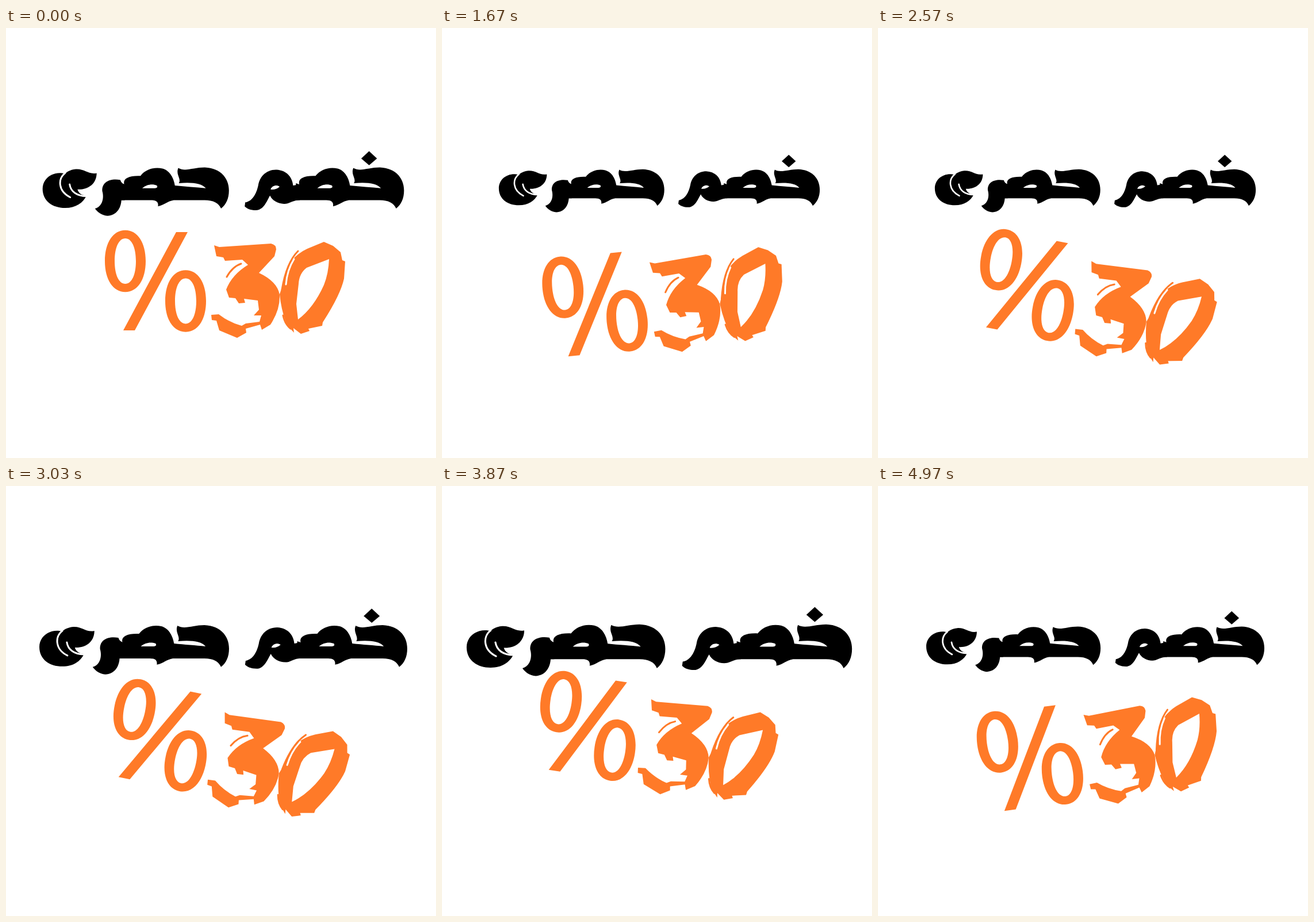
Recreate the animation shown at these times as an HTML page. Size 748 by 748 pixels, loop 5010 ms.

```html
<!DOCTYPE html>
<html lang="ar">
<head>
<meta charset="utf-8">
<style>
  html, body { margin: 0; width: 100%; height: 100%; overflow: hidden; background: #fff; }
  svg { display: block; width: 100%; height: 100%; }
  .gap { fill: none; stroke: #fff; stroke-width: 3; stroke-linecap: round; }
  .bristle { fill: none; stroke: #ff7a28; stroke-width: 3; stroke-linecap: round; }
</style>
</head>
<body>
<svg viewBox="0 0 748 748" role="img" aria-label="خصم حصرى 30%">
  <defs>
    <!-- the joined letters sad and hah, shared by both words -->
    <path id="sadHah" fill-rule="evenodd" d="M202 272 C199 262 210 256 231 257 C238 247 254 240 270 244
      C284 248 290 262 292 274 C310 276 330 277 347 279 C340 270 322 268 299 270
      C304 262 293 255 298 243 C310 250 325 242 345 242 C372 243 388 260 388 283
      C388 297 383 308 374 315 C370 305 360 300 345 300 H290 C278 302 275 308 262 311
      C263 304 260 300 250 300 H196 V270 Z
      M234 279 C242 272 252 271 260 274 C262 277 260 279 256 279 Z"/>
  </defs>

  <g id="title">
    <use href="#sadHah"/>
    <use href="#sadHah" x="311"/>
    <path d="M163 284 C162 268 176 261 195 264 C196 268 199 271 203 272 V300 H197
      C196 315 188 327 172 328 C162 327 155 322 150 315 C162 312 167 298 163 284 Z"/>
    <path d="M92 252 C72 250 57 263 57 280 C57 302 75 314 97 314 C116 314 129 305 135 292
      C127 292 121 288 119 281 C138 282 153 271 153 252
      C138 255 132 244 116 245 C105 246 99 251 97 253 Z"/>
    <path class="gap" d="M97 252 C84 262 84 284 106 295"/>
    <path class="gap" d="M105 272 C107 285 118 293 135 293"/>
    <path fill-rule="evenodd" d="M417 304 C430 302 437 288 440 274 C443 256 456 246 472 246
      C490 247 500 258 502 274 L514 272 V300 C505 300 500 303 492 306
      C480 309 465 302 461 292 C456 300 450 318 436 318 C426 318 420 315 416 311 Z
      M462 281 C464 275 472 272 478 276 C474 280 468 282 462 281 Z"/>
    <path d="M637 213 L651 226 L637 238 L623 226 Z"/>
  </g>

  <g id="price" fill="#ff7a28">
    <path id="percent" fill-rule="evenodd"/>
    <path d="M362 378 L371 381 L461 375 Q470 377 470 385 L467 397 L440 426
      Q472 441 476 464 Q477 490 460 516 L445 525 L442 516 L417 523 L418 530 L402 539
      L371 526 L366 509 L358 508 L357 499 L370 498 Q388 512 410 518 L417 514 L441 511 L444 500
      L431 500 L440 490 L438 474 L414 471 L416 478 L405 479 L399 470 L388 469 L383 455
      Q393 429 421 412 L411 403 L381 405 L378 399 L366 397 Z"/>
    <path class="bristle" d="M384 433 Q394 415 409 410"/>
    <path fill-rule="evenodd" d="M553 372 L569 379 L582 390 L585 404 L590 406 L588 436
      Q582 464 551 512 L550 518 L526 523 L528 527 L513 532 L500 522 L501 530 L489 517
      Q479 493 476 463 Q484 441 488 420 Q498 396 524 384 Z
      M562 402 L523 417 Q510 427 509 445 L505 480 L508 507 Q535 487 553 447 Q561 427 562 402 Z"/>
    <path class="bristle" d="M508 388 C494 402 485 425 480 455"/>
    <path class="bristle" d="M482 500 Q485 515 495 523"/>
    <path class="gap" d="M501 402 Q489 421 487 446"/>
  </g>
</svg>
<script>
const FPS = 30, FRAMES = 150, LOOP = 5010;
const PULSE = 27, PEAK = 4.5, FALL = 16.5;
const SMALL = 537 / 642, SWING = 193 / 642;

const byId = id => document.getElementById(id);

// Key poses of the shaking price
const pose = (frame, x, y, angle) => ({ frame, x, y, angle });
const poses = [
  pose(0, 0, 0, 0), pose(26, -6, -26, 5.6), pose(50, 6, 27, -6.1), pose(77, -4, 30, 11),
  pose(104, 12, 7, 12.4), pose(130, -34, -20, 3.7), pose(149, 4, 17, -7.4)];

function oval(cx, cy, rx, ry, bend = 0.6) {
  const x = rx * bend, y = ry * bend;
  return `M${cx - rx} ${cy} C${cx - rx} ${cy - y} ${cx - x} ${cy - ry} ${cx} ${cy - ry}` +
    `S${cx + rx} ${cy - y} ${cx + rx} ${cy} S${cx + x} ${cy + ry} ${cx} ${cy + ry}` +
    `S${cx - rx} ${cy + y} ${cx - rx} ${cy} Z`;
}
const ring = (cx, cy) => oval(cx, cy, 35.5, 53.7) + oval(cx, cy, 18.5, 39.5);
byId('percent').setAttribute('d',
  ring(207.5, 405.5) + ring(312.5, 475) + 'M296 355 H316 L224 526 H204 Z');

// A pulse shrinks with an ease out, then grows with an ease in
function titleScale(frame) {
  const age = (frame - PEAK + PULSE) % PULSE;
  const size = age < FALL
    ? (1 - age / FALL) ** 1.55
    : ((age - FALL) / (PULSE - FALL)) ** 1.33;
  return SMALL + SWING * size;
}

function pricePose(frame) {
  const next = Math.max(1, poses.findIndex(p => p.frame >= frame));
  const a = poses[next - 1], b = poses[next];
  const u = (frame - a.frame) / (b.frame - a.frame);
  const eased = u * u * (3 - 2 * u);
  const mix = key => a[key] + (b[key] - a[key]) * eased;
  return { x: mix('x'), y: mix('y'), angle: mix('angle') };
}

function draw(ms) {
  const frame = Math.min(FRAMES - 1, Math.floor((ms % LOOP + 3.4) * FPS / 1000));
  byId('title').setAttribute('transform',
    `translate(378 270.5) scale(${titleScale(frame)}) translate(-378 -270.5)`);
  const { x, y, angle } = pricePose(frame);
  byId('price').setAttribute('transform', `translate(${x} ${y}) rotate(${angle} 381 445.5)`);
}

const start = performance.now();
function tick() {
  draw(performance.now() - start);
  requestAnimationFrame(tick);
}
tick();
</script>
</body>
</html>
```
